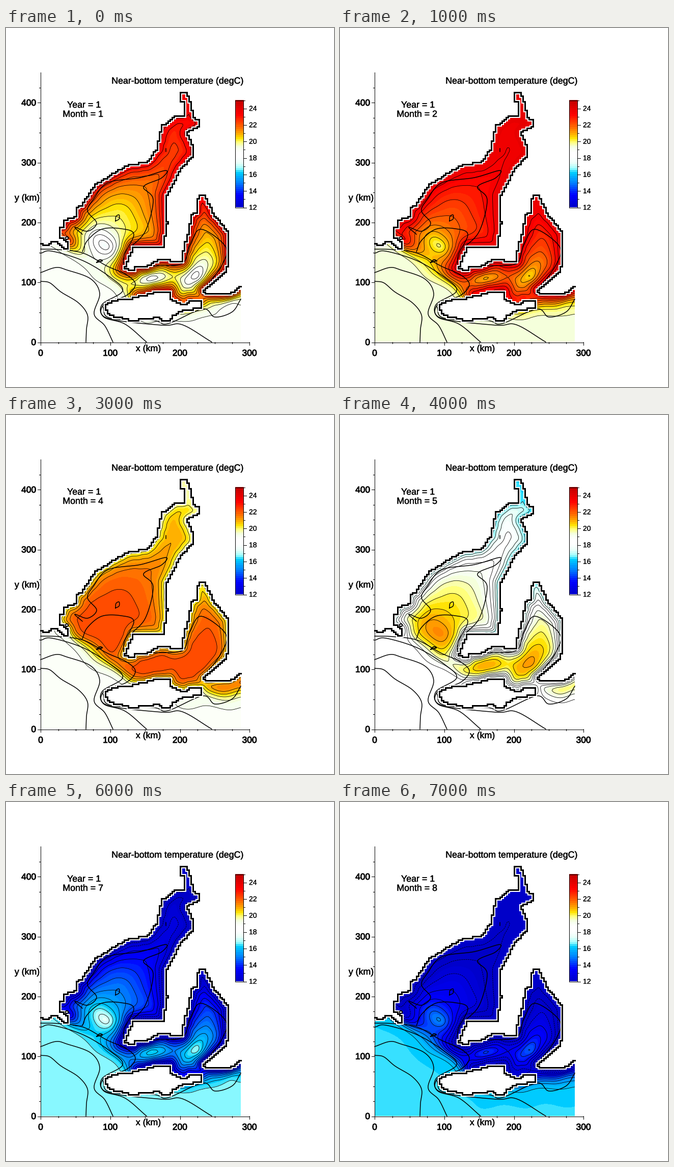
These frames come from a looping animation (644 by 703 pixels, 8000 ms). A matplotlib script:

```python
import numpy as np
import matplotlib.pyplot as plt
from matplotlib.animation import FuncAnimation
from matplotlib.collections import LineCollection
from matplotlib.colors import LinearSegmentedColormap, ListedColormap
from matplotlib.path import Path
from matplotlib.patheffects import withStroke

W, H, DPI = 644, 703, 100
PX = 72 / DPI
X0, X1, Y0 = 68, 461, 615
KX, KY = 410 / 300, 469 / 400          # pixels per km
NX, NY = 96, 141                       # model cells of 3 km
CW, CH = (X1 - X0) / NX, KY * 3

plt.rcParams["font.family"] = "Liberation Sans"
fig = plt.figure(figsize=(W / DPI, H / DPI), dpi=DPI, facecolor="white")
ax = fig.add_axes([0, 0, 1, 1])
ax.set_xlim(0, W)
ax.set_ylim(H, 0)
ax.axis("off")

# ---- coastline: key points, cut into model cells ----
west_coast = [
    (60, 419), (70, 420), (75, 427), (97, 416), (110, 429), (122, 433),
    (123, 421), (116, 413), (104, 412), (104, 389), (114, 388), (114, 377),
    (137, 369), (138, 351), (148, 346), (176, 306), (241, 267), (277, 263),
    (296, 236), (306, 192), (332, 172), (349, 170), (350, 146), (342, 142),
    (342, 125)]
east_coast = [
    (353, 125), (364, 152), (366, 176), (380, 180), (380, 192), (354, 203),
    (369, 238), (367, 250), (342, 276), (324, 314), (314, 328), (312, 376),
    (316, 380), (308, 429), (250, 428), (232, 472)]
strait_coast = [
    (250, 473), (252, 468), (272, 468), (299, 454), (318, 452), (322, 458),
    (346, 456), (348, 436), (360, 390), (362, 368), (374, 360), (374, 342),
    (380, 327), (390, 327), (408, 365), (435, 398), (438, 448), (432, 478),
    (388, 514), (392, 521), (430, 521), (448, 516), (460, 506), (470, 506),
    (470, 620), (60, 620)]
island = [
    (196, 540), (212, 533), (240, 531), (290, 518), (322, 515), (324, 533),
    (352, 542), (362, 534), (382, 534), (384, 548), (350, 552), (326, 564),
    (323, 573), (310, 574), (298, 566), (248, 573), (204, 562), (196, 550)]

xe = X0 + CW * np.arange(NX + 1)
ye = Y0 - CH * np.arange(NY + 1)
cx, cy = np.meshgrid((xe[1:] + xe[:-1]) / 2, (ye[1:] + ye[:-1]) / 2)
cells = np.column_stack([cx.ravel(), cy.ravel()])
sea = Path(west_coast + east_coast + strait_coast).contains_points(cells)
sea &= ~Path(island).contains_points(cells)
sea = sea.reshape(NY, NX)

edges = [[(xe[i + 1], ye[j]), (xe[i + 1], ye[j + 1])]
         for j, i in np.argwhere(sea[:, 1:] != sea[:, :-1])]
edges += [[(xe[i], ye[j + 1]), (xe[i + 1], ye[j + 1])]
          for j, i in np.argwhere(sea[1:] != sea[:-1])]


def coast(color, width, z):
    ax.add_collection(LineCollection(edges, colors=color, linewidths=width * PX,
                                     capstyle="projecting", zorder=z))


ax.pcolormesh(xe, ye, np.ma.masked_where(sea, np.ones((NY, NX))),
              cmap=ListedColormap(["white"]), zorder=3, antialiased=False)
coast("white", 7, 3.1)
coast("black", 3, 5)


# ---- depth contours ----
def smooth(pts, n=10):
    """Catmull-Rom curve through the points."""
    p = np.array(pts, float)
    p = np.vstack([2 * p[0] - p[1], p, 2 * p[-1] - p[-2]])
    t = np.linspace(0, 1, n)[:, None]
    parts = [0.5 * (2 * b + (c - a) * t + (2 * a - 5 * b + 4 * c - d) * t**2
                    + (3 * b - a - 3 * c + d) * t**3)
             for a, b, c, d in zip(p, p[1:], p[2:], p[3:])]
    return np.vstack(parts)


def depth(*pts, width=1.5):
    x, y = smooth(pts).T
    ax.plot(x, y, color="black", lw=width * PX, zorder=2.5)


# open shelf, from deep to shallow
depth((68, 496), (86, 499), (108, 517), (142, 538), (160, 562), (158, 590),
      (157, 615))
depth((68, 479), (98, 469), (120, 474), (166, 491), (184, 520), (173, 560),
      (194, 583), (210, 615))
depth((68, 441), (90, 437), (152, 456), (206, 489), (229, 515), (189, 541),
      (192, 566), (234, 580), (276, 615))
depth((68, 433), (104, 434), (152, 441), (198, 466), (236, 483), (254, 502),
      (236, 524), (193, 540), (198, 568), (306, 582), (346, 581), (404, 615))
depth((190, 545), (204, 568), (290, 573), (318, 579), (386, 550), (410, 566),
      (444, 556), (461, 531))
# gulfs
depth((150, 438), (160, 416), (188, 394), (226, 393), (251, 404), (232, 445),
      (232, 472))
depth((150, 404), (135, 390), (160, 398), (178, 382), (160, 358), (172, 335),
      (200, 303), (264, 293), (314, 279), (305, 294), (270, 311), (289, 336),
      (274, 397), (244, 430))
depth((234, 473), (290, 466), (346, 461), (361, 425), (383, 394), (431, 428),
      (424, 464), (389, 512))
depth((215, 378), (216, 369), (222, 366), (222, 374), (215, 378))
depth((178, 459), (184, 454), (189, 456), (178, 459), width=2)
depth((314, 236), (314, 242))
ax.add_patch(plt.Circle((119.5, 411.5), 2.6, fc="white", ec="black",
                        lw=2 * PX, zorder=6))

# ---- temperature: a yearly wave that lags more in deep, exposed water ----
gx, gy = np.meshgrid(np.linspace(X0, X1, 132), np.linspace(119, Y0, 166))
shore = np.full(gx.shape, 1e6)
for (ax_, ay_), (bx_, by_) in edges:
    shore = np.minimum(shore, np.hypot(gx - (ax_ + bx_) / 2,
                                       gy - (ay_ + by_) / 2))
col = np.clip((gx - X0) / CW, 0, NX - 1).astype(int)
row = np.clip((Y0 - gy) / CH, 0, NY - 1).astype(int)
hidden = ~sea[row, col] & (shore > 6)


def blur(a, rounds=4):
    for _ in range(rounds):
        p = np.pad(a, 1, mode="edge")
        a = (p[:-2, 1:-1] + p[2:, 1:-1] + p[1:-1, :-2] + p[1:-1, 2:]
             + 2 * a) / 6
    return a


# a gentle warp gives the isotherms their meanders
wx = gx + 5 * np.sin(gy / 14 + gx / 40)
wy = gy + 4 * np.sin(gx / 13 - gy / 35)
mouths = [(192, 428), (280, 492), (375, 490), (440, 538)]
reach = np.min([np.hypot(wx - x, wy - y) for x, y in mouths], axis=0)
lag = blur(1.5 + 2.6 * (1 - np.exp(-shore / 14)) / (1 + reach / 100))
front = np.minimum(415 + 0.82 * (wx - 115), 542)
shelf = blur(1 / (1 + np.exp((front - wy) / 8)))


def wave(mean, swing, month, peak):
    return mean + swing * np.cos(np.pi / 6 * (month - peak))


def temperature(month):
    gulf = wave(17.5, 6.6 - 0.85 * (lag - 1.5), month, lag)
    ocean = wave(17.8, 1.6, month, 2.5)
    return np.ma.masked_where(hidden, shelf * ocean + (1 - shelf) * gulf)


# ---- colours ----
stops = [(12, "#0000c8"), (13.5, "#0000ff"), (15, "#0082ff"),
         (16.2, "#00d0ff"), (16.7, "#a0ffff"), (17.3, "#e6fff8"),
         (18, "#ffffff"), (18.7, "#ffffff"), (19.3, "#f4ffe8"),
         (19.9, "#ffff78"), (20.4, "#ffe100"), (21, "#ffa500"),
         (22, "#ff5500"), (23.2, "#ff0000"), (24.2, "#dc0000"),
         (25, "#be0000")]
cmap = LinearSegmentedColormap.from_list(
    "sea", [((t - 12) / 13, c) for t, c in stops], N=1024)


def shade(t):
    return cmap((t - 12) / 13)


bands = np.arange(12, 25.01, 0.25)
fills = [shade(t + 0.125) for t in np.arange(11.75, 25.01, 0.25)]
isotherms = np.arange(10, 26, 0.5)
dashes = ["dashed" if t <= 12.5 else "solid" for t in isotherms]


# ---- frame, scale and labels ----
def line(x, y):
    ax.plot(x, y, color="black", lw=PX, zorder=8)


def label(x, y, s, size=17.8, ha="center", weight=0.3):
    t = ax.text(x, y, s, fontsize=size * PX, ha=ha, va="baseline", zorder=9)
    t.set_path_effects([withStroke(linewidth=weight, foreground="black")])
    return t


line([68.5, 68.5], [87, 615])
line([68, 478], [615.5, 615.5])
for km in range(0, 450, 25):
    size = 3 if km % 100 else 6
    x, y = X0 + km * KX, Y0 - km * KY
    line([68 - size, 68], [y + 0.5] * 2)
    if km % 100 == 0:
        label(59, y + 6, str(km), 17.4, "right", 0.6)
    if km <= 300:
        line([x + 0.5] * 2, [615, 615 + size])
        if km % 100 == 0:
            label(x, 642, str(km), 17.4, weight=0.6)

BAR, DEG = 351, 210 / 13
for t in bands[:-1]:
    ax.add_patch(plt.Rectangle((450, BAR - (t - 12) * DEG), 17, -DEG / 4,
                               fc=shade(t + 0.125), lw=0, zorder=7,
                               antialiased=False))
line([450.5, 466.5, 466.5, 450.5, 450.5], [141.5, 141.5, 351.5, 351.5, 141.5])
for t in range(12, 26):
    y = BAR - (t - 12) * DEG + 0.5
    line([466, 469 if t % 2 else 472], [y, y])
    if t % 2 == 0:
        label(477, y + 4.5, str(t), 14, "left", 0.1)

label(336.5, 109, "Near-bottom temperature (degC)")
label(153, 156, "Year = 1")
month_text = label(151, 174, "Month = 1")
label(41.5, 338, "y (km)")
label(279.5, 633, "x (km)")

drawn = []


def draw(i):
    while drawn:
        drawn.pop().remove()
    temp = temperature(i + 1)
    drawn.append(ax.contourf(gx, gy, temp, levels=bands, colors=fills,
                             extend="both", antialiased=False, zorder=1))
    drawn.append(ax.contour(gx, gy, temp, levels=isotherms, colors="black",
                            linewidths=0.8 * PX, linestyles=dashes, zorder=2))
    month_text.set_text(f"Month = {i + 1}")
    return [month_text]


anim = FuncAnimation(fig, draw, frames=8, interval=1000, repeat=True,
                     repeat_delay=0, blit=False)
plt.show()
```
